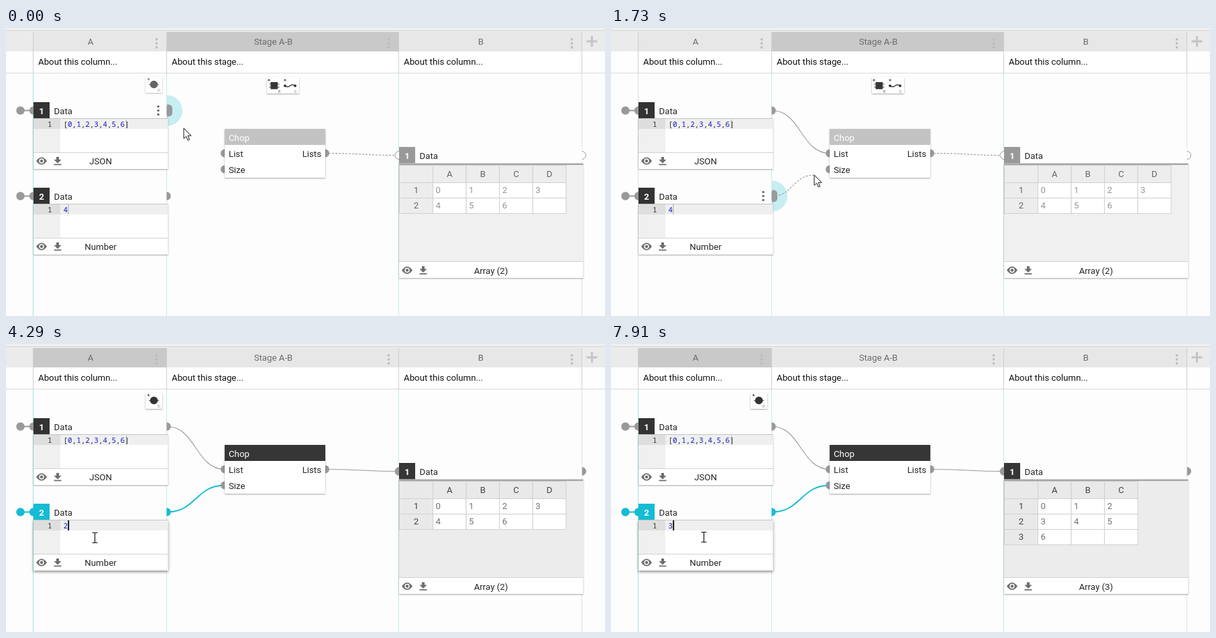
These frames come from a looping animation (893x431 px, 8000 ms). An HTML page:

```html
<!DOCTYPE html>
<html lang="en">
<head>
<meta charset="utf-8">
<title>Column editor</title>
<style>
  html, body { margin: 0; width: 100%; height: 100%; overflow: hidden; background: #fdfdfd; }
  svg { display: block; width: 893px; height: 431px; font: 13.25px Roboto, "Open Sans", sans-serif; }
  text { fill: #262626; white-space: pre; }
  .mid { text-anchor: middle; }
  .end { text-anchor: end; }
  .about { fill: #111; }
  .title { fill: #6c6c6c; }
  .white { fill: #fff; }
  .bold { font-weight: 700; }
  .tiny { font-size: 6px; fill: #777; }
  .mono { font: 10.92px "Noto Sans Mono", "DejaVu Sans Mono", monospace; fill: #333; }
  .num { fill: #1a1ac8; }
  .card { filter: drop-shadow(0 1px 1px rgba(0,0,0,.35)); }
  .raised { filter: drop-shadow(0 2px 2px rgba(0,0,0,.45)); }
  .port { fill: #999; }
  .wire { fill: none; stroke: #9a9a9a; stroke-width: 1.1; }
  .dash { stroke-dasharray: 3 2; }
  .head { fill: #c3c3c3; }
  .badgeB { fill: #999; }
  .area { fill: #f0f0f0; }
  .cell { fill: #fff; stroke: #d0d0d0; }
  .rim { fill: #ededed; stroke: #d0d0d0; }
  .rimText { fill: #666; }
  .cellText { fill: #969696; }
  .portB { fill: #fff; stroke: #999; }
  .live .head, .live .badgeB { fill: #363636; }
  .live .area { fill: #ececec; }
  .live .rim { fill: #e9e9e9; }
  .live .rimText { fill: #444; }
  .live .cellText { fill: #727272; }
  .live .portB { fill: #999; }
  .focus .hot { fill: #14bcd4; }
  .focus .hotLine { stroke: #14bcd4; stroke-width: 2; }
</style>
</head>
<body>
<svg id="stage" viewBox="0 0 893 431"></svg>
<script>
const LOOP = 8000;
const CYAN = '#a5e3e6', PALE = '#cfe9e9', GREY = '#dedede';
const HEAD = '#e7e7e7', HEAD_ON = '#c9c9c9';
const stage = document.getElementById('stage');

// ---- drawing helpers ----
const rect = (x, y, w, h, fill, more = '') =>
  `<rect x="${x}" y="${y}" width="${w}" height="${h}" ${fill ? `fill="${fill}"` : ''} ${more}/>`;
const text = (x, y, s, cls = '', more = '') => `<text x="${x}" y="${y}" class="${cls}" ${more}>${s}</text>`;
const dot = (x, y, r, more = 'class="port"') => `<circle cx="${x}" cy="${y}" r="${r}" ${more}/>`;
const line = (x1, y1, x2, y2, color, more = '') =>
  `<line x1="${x1}" y1="${y1}" x2="${x2}" y2="${y2}" stroke="${color}" ${more}/>`;
const half = (x, y, r, right, more = 'class="port"') =>
  `<path d="M${x} ${y - r}A${r} ${r} 0 0 ${right ? 1 : 0} ${x} ${y + r}" ${more}/>`;
const dots = (x, y, color, more = '') =>
  `<g fill="${color}" ${more}>${[-6, 0, 6].map(d => dot(x, y + d, 1.8, '')).join('')}</g>`;
const curve = (x1, y1, x2, y2) => {
  const m = (x1 + x2) / 2;
  return `M${x1} ${y1}C${m} ${y1} ${m} ${y2} ${x2} ${y2}`;
};
const plus = (x, y, r, color, w) =>
  `<path d="M${x - r} ${y}h${2 * r}M${x} ${y - r}v${2 * r}" stroke="${color}" stroke-width="${w}"/>`;

const icons = y => `
  <path d="M45 ${y}Q53 ${y - 11} 61 ${y}Q53 ${y + 11} 45 ${y}Z" fill="#6e6e6e"/>
  ${dot(53, y, 3.7, 'fill="#fff"')}${dot(53, y, 2.2, 'fill="#6e6e6e"')}
  <path d="M75 ${y - 6}h4v4h3.5l-5.5 5.5l-5.5 -5.5h3.5zM71.5 ${y + 4.5}h11v1.8h-11z" fill="#6e6e6e"/>`;

const header = (x, w, title, about, id) =>
  rect(x, 6, w, 29, HEAD, `id="${id}"`) +
  text(x + w / 2 - 14, 25, title, 'mid title') +
  dots(x + w - 14.5, 23, '#bbb') +
  rect(x, 35, w, 32, '#fff') + text(x + 7, 55.2, about, 'about');

function editorCard(n, y, kind, body) {
  const hot = n === 2 ? 'hot' : '', mid = y + 12.5;
  return `
    ${half(40, mid, 22, false, `id="haloL${n}" fill="#c6eef3" opacity="0"`)}
    ${line(21, mid, 41, mid, '#999', `stroke-width="2" class="${hot}Line"`)}
    ${dot(21.5, mid, 6.2, `class="port ${hot}"`)}
    ${half(41, mid, 6.2, false, `class="port ${hot}"`)}
    ${half(240, mid, 23, true, `id="halo${n}" fill="#c6eef3"`)}
    ${rect(41, y + 24, 200.5, 76, '#fff', `class="card" id="card${n}"`)}
    ${rect(41, y, 198, 24, '#fdfdfd')}
    ${half(239.5, mid, 6.2, true, `class="port ${hot}"`)}
    <path id="grip${n}" class="port" d="M240 ${y + 3.5}h3q5 1 5 6v6q0 5 -5 6h-3z"/>
    ${rect(41, y, 24, 24.5, '#333', `id="badge${n}"`)}
    ${text(53, y + 17.5, n, 'mid white bold')}
    ${text(71.5, y + 17.5, 'Data')}
    ${dots(227, mid, '#707070', `id="menu${n}"`)}
    ${rect(41, y + 24, 40, 51, '#f0f0f0')}
    ${rect(41, y + 25, 40, 15, '#dedede')}
    ${rect(81, y + 25, 160, 15, '#efefef')}
    ${line(41, y + 24.5, 241.5, y + 24.5, '#c4c4c4')}
    ${line(41, y + 75.5, 241.5, y + 75.5, '#d2d2d2')}
    ${text(68.5, y + 36.5, 1, 'mono end')}
    ${body(y)}
    ${icons(y + 88)}
    ${text(141, y + 93, kind, 'mid')}`;
}

function table(n) {
  const size = 7, rows = Math.ceil(size / n), colX = i => 636.5 + i * 49.6, rowY = i => 231.5 + i * 23;
  let s = rect(586.5, 205.5, 50, 26, '', 'class="rim"');
  for (let c = 0; c < n; c++) {
    s += rect(colX(c), 205.5, 49.6, 26, '', 'class="rim"') +
      text(colX(c) + 24.8, 223, 'ABCD'[c], 'mid rimText');
  }
  for (let r = 0; r < rows; r++) {
    s += rect(586.5, rowY(r), 50, 23, '', 'class="rim"') + text(611.5, rowY(r) + 15.5, r + 1, 'mid rimText');
    for (let c = 0; c < n; c++) {
      const v = r * n + c;
      s += rect(colX(c), rowY(r), 49.6, 23, '', 'class="cell"') +
        (v < size ? text(colX(c) + 4, rowY(r) + 15.5, v, 'cellText') : '');
    }
  }
  return `<g id="table${n}">${s}</g>`;
}

const listBody = y => {
  const nums = [0, 1, 2, 3, 4, 5, 6].map(v => `<tspan class="num">${v}</tspan>`).join(',');
  return text(85.5, y + 36.5, `[${nums}]`, 'mono') + line(179.5, y + 26, 179.5, y + 39, '#aaa');
};
const sizeBody = y =>
  rect(85.5, y + 25, 6.6, 15, '#b3d3fb', 'id="pick"') +
  text(85.5, y + 36.5, 4, 'mono num', 'id="digit"') +
  rect(92.5, y + 25, 1, 15, '#aaa', 'id="caret"');

stage.innerHTML = `
  ${rect(0, 0, 893, 431, '#fdfdfd')}
  ${rect(0, 0, 893, 6, '#f0f0f0')}${line(0, 4, 893, 4, '#cdcdcd')}
  ${rect(0, 6, 893, 29, '#ebebeb')}${rect(0, 35, 893, 32, '#fefefe')}
  ${header(41, 198, 'A', 'About this column...', 'headA')}
  ${header(240, 345, 'Stage A-B', 'About this stage...', 'headS')}
  ${header(586, 272, 'B', 'About this column...', 'headB')}
  ${plus(873.5, 20, 8, '#c4c4c4', 3)}
  ${[40.5, 239.5, 585.5, 858.5].map((x, i) =>
    line(x, 6, x, 67, '#cfcfcf') + line(x, 67, x, 431, GREY, `id="rule${i}"`)).join('')}
  ${line(0, 67.5, 893, 67.5, '#b8b8b8', 'stroke-dasharray="1 1"')}

  <g id="barA">
    ${rect(208, 73, 25, 24, '#fff', 'class="card"')}
    ${line(213, 84.5, 228, 84.5, '#444')}${dot(220.5, 84.5, 5.8, 'fill="#333"')}
    ${plus(212.5, 76.5, 2, '#555', 1)}${text(226, 95, 'D', 'tiny')}
  </g>
  <g id="barS">
    ${rect(389, 74, 48, 24, '#fff', 'class="card"')}
    ${rect(394.5, 81, 10.5, 10.5, '#333')}
    <path d="M392.5 84h15M392.5 88.5h15" stroke="#444"/>
    ${plus(392, 78, 2, '#555', 1)}${text(405.5, 96.5, 'B', 'tiny')}
    ${dot(416, 86.5, 2, 'fill="#333"')}${dot(431, 86.5, 2, 'fill="#333"')}
    <path d="M416 86.5q4 3 7.5 0t7.5 0" fill="none" stroke="#333" stroke-width="1.3"/>
    ${plus(416, 78, 2, '#555', 1)}${text(429.5, 96.5, 'C', 'tiny')}
  </g>

  ${editorCard(1, 111, 'JSON', listBody)}
  ${editorCard(2, 239, 'Number', sizeBody)}

  <path id="wire1" class="wire"/>
  <path id="wire2" class="wire hotLine"/>
  <path id="wire3" class="wire" d="${curve(476, 187.5, 586, 190.5)}"/>

  ${half(326, 187.5, 6, false)}${half(326, 211.5, 6, false)}${half(476, 187.5, 6, true)}
  ${rect(326, 151, 150, 73, '#fff', 'class="card"')}
  ${rect(326, 151, 150, 24, '', 'class="head"')}
  ${text(332, 168.5, 'Chop', 'white')}
  ${text(332, 192.5, 'List')}${text(470, 192.5, 'Lists', 'end')}${text(332, 216.5, 'Size')}

  ${half(586, 190.5, 6, false, 'class="portB"')}${half(858.5, 190.5, 6, true, 'class="portB"')}
  ${rect(586, 203, 274.5, 171, '#fff', 'class="card"')}
  ${rect(586, 178, 272.5, 25, '#fdfdfd')}
  ${rect(586, 178, 24, 24.5, '', 'class="badgeB"')}
  ${text(598, 195.5, 1, 'mid white bold')}${text(616.5, 195.5, 'Data')}
  ${rect(586, 205, 274.5, 144, '', 'class="area"')}
  ${rect(586, 202.5, 274.5, 2.5, '#a6a6a6')}
  ${table(4)}${table(2)}${table(3)}
  ${line(586, 349.5, 860.5, 349.5, '#d2d2d2')}
  <g transform="translate(545 163)">${icons(199.5)}</g>
  ${text(723, 367.5, '', 'mid', 'id="sum"')}

  <g id="pointer">
    <path id="arrow" d="M0 0V15.5L3.6 12.2L6.2 18L8.6 17L6.1 11.2H11Z" fill="#fff" stroke="#111" stroke-linejoin="round"/>
    <path id="resize" d="M-10.5 0L-5.5 -4.5V-1.8H5.5V-4.5L10.5 0L5.5 4.5V1.8H-5.5V4.5Z" fill="#fff" stroke="#111"/>
    <path id="beam" d="M-3.5 -7.5h8M.5 -7V8M-3.5 7.5h8" fill="none" stroke="#111" stroke-width="1.2"/>
  </g>`;

// ---- timeline ----
const el = {};
stage.querySelectorAll('[id]').forEach(e => { el[e.id] = e; });

const ticks = [0];
for (const [a, b] of [[120, 1120], [1270, 2240], [2390, 3360], [3480, 4410], [4530, 5460], [5610, 6490]]) {
  for (let i = 0; i < 8; i++) ticks.push(a + (b - a) * i / 7);
}
ticks.push(6920, 7320, 7475, 7630, 7910);

// time, x, y
const path = [
  [0, 265, 150], [120, 276, 160], [420, 318, 187], [560, 319, 188], [1120, 258, 247],
  [1270, 246, 252], [1400, 248, 253], [1800, 317, 212], [1960, 318, 213], [2390, 225, 273],
  [2800, 105, 271], [3080, 98, 271], [3360, 47, 271], [3480, 45, 271], [3620, 47, 271],
  [4290, 132, 290], [4530, 135, 289], [4900, 268, 276], [5060, 266, 274], [5460, 168, 273],
  [5610, 160, 272], [6000, 55, 272], [6130, 56, 272], [6490, 142, 296], [7900, 142, 296], [7910, 138, 289]
];
const shapes = [[0, 'arrow'], [2200, 'resize'], [2500, 'beam'], [4700, 'arrow'], [5250, 'beam']];
const digits = [[0, 4], [4150, 2], [6920, 3]];
const sizes = [[0, 4], [4900, 2], [7320, 3]];
const fadeA = [[0, .75], [120, .4], [260, 0], [3360, 0], [3480, .4], [3620, 1]];
const fadeS = [[0, 1], [3480, 1], [3900, 0], [4750, 0], [5000, 1], [5460, .9], [5800, 0]];
const fadeHalo = [[0, 0], [3200, 0], [3480, .5], [3760, 0]];

const at = (list, t) => list.reduce((v, [s, x]) => (t >= s ? x : v), list[0][1]);
const within = (t, a, b) => t >= a && t < b;
const ease = k => k * k * (3 - 2 * k);
function mix(list, t, col = 1, f = k => k) {
  const i = list.findIndex(r => r[0] > t);
  if (i < 0) return list[list.length - 1][col];
  const a = list[i - 1], b = list[i];
  return a[col] + (b[col] - a[col]) * f((t - a[0]) / (b[0] - a[0]));
}
const show = (id, on) => { el[id].style.display = on ? '' : 'none'; };
const set = (id, name, v) => el[id].setAttribute(name, v);

function dragWire(id, t, from, drop, y1, y2, x, y) {
  show(id, t >= from);
  const [ex, ey] = t < drop ? [x, y] : [326, y2];
  set(id, 'd', curve(240, y1, ex, ey));
}

function render(now) {
  const t = ticks.reduce((v, s) => (now + .01 >= s ? s : v), 0);
  const x = Math.round(mix(path, t, 1, ease)), y = Math.round(mix(path, t, 2, ease));
  const live = t >= 2640, focus = t >= 3600, away = within(t, 4700, 5250);

  stage.classList.toggle('live', live);
  stage.classList.toggle('focus', focus);

  set('pointer', 'transform', `translate(${x} ${y})`);
  const shape = at(shapes, t);
  for (const s of ['arrow', 'resize', 'beam']) show(s, s === shape);

  set('headA', 'fill', focus ? HEAD_ON : HEAD);
  set('headS', 'fill', focus ? HEAD : HEAD_ON);
  set('rule0', 'stroke', within(t, 1200, 2700) || away ? GREY : CYAN);
  set('rule1', 'stroke', PALE);
  set('rule2', 'stroke', within(t, 2200, 2700) ? GREY : PALE);
  set('barA', 'opacity', mix(fadeA, t));
  set('barS', 'opacity', mix(fadeS, t));

  // ports and wires
  show('halo1', t < 480);
  show('halo2', within(t, 1250, 1900));
  show('menu1', t < 600);
  show('menu2', within(t, 1050, 1900));
  show('grip1', t < 480);
  show('grip2', within(t, 1050, 1900));
  set('haloL2', 'opacity', mix(fadeHalo, t));
  dragWire('wire1', t, 120, 420, 123.5, 187.5, x, y);
  dragWire('wire2', t, 1400, 1800, 251.5, 211.5, x, y);
  el.wire2.classList.toggle('dash', !live);
  el.wire3.classList.toggle('dash', !live);

  // number editor
  set('badge2', 'fill', focus ? '#14bcd4' : t >= 3100 ? '#757575' : '#333');
  set('card2', 'class', t >= 3100 ? 'raised' : 'card');
  const pick1 = within(t, 3180, 4150), pick2 = within(t, 6250, 6920);
  show('pick', pick1 || pick2);
  el.digit.textContent = at(digits, t);
  const active = t >= 3050;
  set('caret', 'x', pick1 ? 85.5 : 92.3);
  set('caret', 'width', active ? 1.8 : 1);
  set('caret', 'fill', active ? '#000' : '#aaa');
  show('caret', !within(t, 7475, 7910));

  // result
  const n = at(sizes, t);
  for (const k of [2, 3, 4]) show('table' + k, k === n);
  el.sum.textContent = `Array (${Math.ceil(7 / n)})`;
}

function frame() {
  render(performance.now() % LOOP);
  requestAnimationFrame(frame);
}
frame();
</script>
</body>
</html>
```
